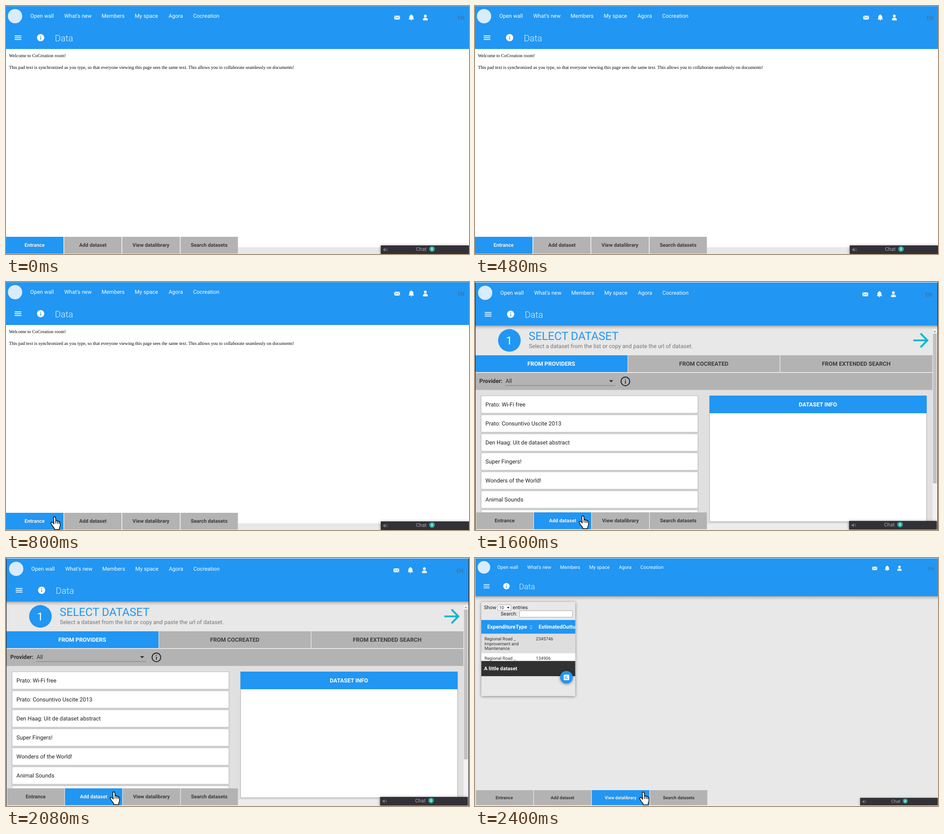
An HTML page that plays this animation: 1023x548 px, repeating every 3.2 s.

```html
<!DOCTYPE html>
<html lang="en">
<head>
<meta charset="utf-8">
<title>Data room</title>
<style>
html, body { margin: 0; width: 100%; height: 100%; overflow: hidden; background: #fff; }
svg { display: block; width: 100%; height: 100%; }
text { font-family: Roboto, sans-serif; text-rendering: geometricPrecision; white-space: pre; }
.pad { font: 10.22px "Liberation Serif", serif; }
.mid { text-anchor: middle; }
.b { font-weight: 700; }
.blue { fill: #2196f3; }
.white { fill: #fff; }
.grey { fill: #b3b3b3; }
.dark { fill: #3c3c3c; }
.line { fill: none; stroke: #2196f3; }
.card { fill: #fff; stroke: #bdbdbd; filter: drop-shadow(0 1px 1px rgba(0,0,0,.15)); }
.lift { filter: drop-shadow(0 1px 3px rgba(0,0,0,.45)); }

.point, .add, .view { opacity: 0; animation: 3.2s step-end infinite; }
.point { animation-name: point; }
.add { animation-name: add; }
.view { animation-name: view; }
@keyframes point { 0% { opacity: 0 } 25%, 50% { opacity: 1 } 100% { opacity: 0 } }
@keyframes add { 0% { opacity: 0 } 50% { opacity: 1 } 100% { opacity: 0 } }
@keyframes view { 0% { opacity: 0 } 75% { opacity: 1 } 100% { opacity: 0 } }
</style>
</head>
<body>
<svg viewBox="0 0 1023 548">
  <defs>
    <linearGradient id="fade" x2="0" y2="1">
      <stop stop-color="#000" stop-opacity=".32"/>
      <stop offset=".4" stop-color="#000" stop-opacity=".12"/>
      <stop offset="1" stop-color="#000" stop-opacity="0"/>
    </linearGradient>
    <clipPath id="frame"><rect x="14" y="97" width="207.5" height="208"/></clipPath>

    <g id="nav" class="white">
      <circle cx="20" cy="22.5" r="15.8" fill="#d9ecfd"/>
      <g font-size="12">
        <text x="53.5" y="26.4">Open wall</text>
        <text x="128.7" y="26.4">What's new</text>
        <text x="211.3" y="26.4">Members</text>
        <text x="284.6" y="26.4">My space</text>
        <text x="359.2" y="26.4">Agora</text>
        <text x="413.4" y="26.4">Cocreation</text>
      </g>
      <path d="M19 65.2h15v1.7h-15zm0 4h15v1.7h-15zm0 4h15v1.7h-15z"/>
      <circle cx="76.5" cy="70" r="8"/>
      <path class="blue" d="M75.6 69.2h1.8v4.8h-1.8zm0-3.3h1.8v1.8h-1.8z"/>
      <text x="108" y="77.5" font-size="19.7" font-weight="300" opacity=".88">Data</text>
    </g>

    <g id="tools" class="white">
      <rect x="857.8" y="21.4" width="12.6" height="8.6" rx="1"/>
      <path class="line" d="M858.2 22.2l5.9 4.3 5.9-4.3M858.2 29.6l4.1-4M870 29.6l-4.1-4" stroke-width="1"/>
      <path d="M889.6 29.8v-.8l1.5-1.5v-3.6q0-3 3.2-3.9 0-1.4 1.2-1.4t1.2 1.4q3.2.9 3.2 3.9v3.6l1.5 1.5v.8zM893.9 30.5h3.2q-.2 1.7-1.6 1.7t-1.6-1.7z"/>
      <circle cx="926.5" cy="22.1" r="3.1"/>
      <path d="M921.2 31.8v-2q0-3.7 5.3-3.7t5.3 3.7v2z"/>
      <text x="998" y="30.3" font-size="11.4" style="fill:#4b6a88">EN</text>
    </g>

    <g id="chat">
      <rect class="lift" x="828" y="529" width="195" height="19" fill="#323138"/>
      <path d="M833.5 536.6h2l3-2.5v8.8l-3-2.5h-2z" fill="#77767c"/>
      <path d="M840 536.4q1.4 2 0 4.2M841.7 535q2.4 3.5 0 7" fill="none" stroke="#77767c" stroke-width=".9"/>
      <text x="906" y="541.4" font-size="11.2" fill="#aaa9ad">Chat</text>
      <circle cx="941.3" cy="537" r="6.3" fill="#26a69a"/>
      <text class="mid b white" x="941.3" y="540" font-size="8.5">0</text>
    </g>

    <g id="boxes" class="grey">
      <rect y="510" width="127" height="37.3"/>
      <rect x="128.4" y="510" width="127" height="37.3"/>
      <rect x="256.8" y="510" width="127.4" height="37.3"/>
      <rect x="385.6" y="510" width="126.8" height="37.3"/>
    </g>
    <g id="labels" class="mid b">
      <text x="63.2" y="532">Entrance</text>
      <text x="192" y="532">Add dataset</text>
      <text x="320.3" y="532">View datalibrary</text>
      <text x="448.8" y="532">Search datasets</text>
    </g>

    <g id="hand" stroke="#000" stroke-width="1.4" stroke-linejoin="round">
      <path class="white" d="M7 3Q7 .8 9 .8 11.3 .8 11.5 3L12 10Q12.3 8.7 14 9 15.7 9.2 15.8 11 16.3 9.9 17.6 10.2 19.2 10.5 19.3 12.2 20 11.6 20.9 12 22 12.6 22 14L21.8 20Q21.5 23 20 25V29H9V26.5Q5 22 2 16.5 .6 14 2 13 3.8 12.2 5.5 14L8 16.5Z"/>
      <path fill="none" d="M12 10v5.5M15.8 11v5M19.3 12.2v4.3"/>
    </g>
  </defs>

  <!-- Entrance -->
  <g>
    <rect class="white" width="1023" height="548"/>
    <rect class="blue" width="1023" height="95"/>
    <rect width="1023" height="1" fill="#7ba6cc"/>
    <use href="#nav"/>
    <use href="#tools"/>
    <text class="pad" x="6.4" y="113">Welcome to CoCreation room!</text>
    <text class="pad" x="6.4" y="139.3">This pad text is synchronized as you type, so that everyone viewing this page sees the same text. This allows you to collaborate seamlessly on documents!</text>
    <rect x="512.4" y="533" width="511" height="15" fill="#e8e8e8"/>
    <use href="#boxes"/>
    <rect class="blue" y="510" width="127" height="37.3"/>
    <use href="#labels" class="dark" font-size="11.2"/>
    <text class="mid b white" x="63.2" y="532" font-size="11.2">Entrance</text>
    <use href="#chat"/>
  </g>
  <use class="point" href="#hand" x="98" y="518"/>

  <!-- Add dataset -->
  <g class="add">
    <rect width="1023" height="548" fill="#e0e0e0"/>
    <rect y="96" width="1023" height="66" fill="#e8e8e8"/>
    <rect y="96" width="1023" height="9" fill="url(#fade)"/>
    <rect class="blue" y="1" width="1023" height="95"/>
    <rect width="1023" height="1.2" fill="#dfe6ec"/>
    <g transform="translate(2.6 1.6) scale(.995)">
      <use href="#nav"/>
      <use href="#tools"/>
    </g>

    <circle class="blue" cx="76" cy="129" r="25"/>
    <text class="mid white" x="75.5" y="137.5" font-size="24.5">1</text>
    <text class="blue" x="118.6" y="127.6" font-size="25">SELECT DATASET</text>
    <text x="119" y="146" font-size="12.5" fill="#757575">Select a dataset from the list or copy and paste the url of dataset.</text>
    <path d="M968.5 129h30M984.5 113.8l15 15.2-15 15.2" fill="none" stroke="#10b8d2" stroke-width="4.2"/>

    <rect y="161" width="1011" height="40" fill="#e4e4e4"/>
    <rect class="blue" x="1" y="162" width="336" height="37"/>
    <path class="grey" d="M338.3 162h335v37h-335zM674.8 162h336v37h-336zM1 201h1009.8v37.5H1z"/>
    <g class="mid b dark" font-size="12.6">
      <text class="white" x="168.5" y="185">FROM PROVIDERS</text>
      <text x="505.5" y="185">FROM COCREATED</text>
      <text x="842.3" y="185">FROM EXTENDED SEARCH</text>
    </g>
    <g font-size="12.5" fill="#2c2c2c">
      <text class="b" x="9.6" y="223">Provider:</text>
      <text x="67.4" y="223">All</text>
      <path d="M67 228.2h243v1H67z" fill="#777"/>
      <path d="M296.3 217h9l-4.5 4.6z"/>
      <circle cx="332.3" cy="219.6" r="9.6" fill="none" stroke="#222" stroke-width="2"/>
      <path d="M331.3 218.5h2v6h-2zm0-4h2v2.1h-2z"/>
    </g>

    <g class="card">
      <rect x="13.5" y="251.5" width="479" height="38.4"/>
      <rect x="13.5" y="293.5" width="479" height="38.4"/>
      <rect x="13.5" y="335.5" width="479" height="38.4"/>
      <rect x="13.5" y="377.5" width="479" height="38.4"/>
      <rect x="13.5" y="419.5" width="479" height="38.4"/>
      <rect x="13.5" y="461.5" width="479" height="38.4"/>
      <rect x="13.5" y="503.5" width="479" height="38.4"/>
      <rect x="518.5" y="251.5" width="479" height="278"/>
    </g>
    <g font-size="12.5" fill="#212121">
      <text x="23" y="275">Prato: Wi-Fi free</text>
      <text x="23" y="317">Prato: Consuntivo Uscite 2013</text>
      <text x="23" y="359">Den Haag: Uit de dataset abstract</text>
      <text x="23" y="401">Super Fingers!</text>
      <text x="23" y="443">Wonders of the World!</text>
      <text x="23" y="485">Animal Sounds</text>
    </g>
    <rect class="blue" x="518" y="251" width="480" height="39"/>
    <text class="mid b white" x="757.8" y="275" font-size="12.5">DATASET INFO</text>

    <rect x="1010.8" y="104" width="10.5" height="430" fill="#f1f1f1"/>
    <rect x="1011.8" y="114" width="8.4" height="331" fill="#c1c1c1"/>
    <path d="M1013.4 110.6h5l-2.5-3z" fill="#888"/>

    <rect x="1" y="534" width="1021" height="14" fill="#ececec"/>
    <rect x="1" y="508.5" width="512" height="39" fill="#e8e8e8"/>
    <g transform="translate(2.6 1.6) scale(.995)">
      <use href="#boxes"/>
      <rect class="blue" x="128.4" y="510" width="127" height="37.3"/>
      <use href="#labels" class="dark" font-size="11.2"/>
      <text class="mid b white" x="192" y="532" font-size="11.2">Add dataset</text>
      <use href="#chat"/>
    </g>
    <path d="M0 1h1.2v547H0zM1021.8 1h1.2v547h-1.2z" fill="#2b2b2b"/>
    <use href="#hand" x="229" y="516"/>
  </g>

  <!-- View datalibrary -->
  <g class="view">
    <rect width="1023" height="548" fill="#e8e8e8"/>
    <rect y="84" width="1023" height="9" fill="url(#fade)"/>
    <rect class="blue" x="1" y="1" width="1022" height="83.2"/>
    <path d="M0 0h1023v1H1v547H0z" fill="#d4d9de"/>
    <use href="#nav" transform="translate(2.2 .8) scale(.879)"/>
    <use href="#tools" transform="translate(123.5 .4) scale(.879)"/>

    <rect class="lift" x="14" y="97" width="207.5" height="208" fill="#e8e8e8"/>
    <g clip-path="url(#frame)">
      <g font-size="11" fill="#1c1c1c">
        <text x="19.8" y="112.8">Show</text>
        <text x="83.3" y="112.8">entries</text>
        <text x="56.8" y="127">Search:</text>
        <path d="M50.5 103.5h29v12.4h-29zM98.5 116.5h117v14.3h-117z" fill="#fff" stroke="#aaa"/>
        <text x="53.5" y="113.2" font-size="9.4">10</text>
        <path d="M70.8 108h5l-2.5 4z"/>
      </g>
      <rect class="blue" x="14" y="137" width="208" height="30.5"/>
      <g class="b white" font-size="11.7">
        <text x="27" y="156.3">ExpenditureType</text>
        <text x="140.4" y="156.3">EstimatedOutturn</text>
      </g>
      <path d="M121.5 151.3l2.3-2.3 2.3 2.3M121.5 154l2.3 2.3 2.3-2.3" fill="none" stroke="#fff"/>
      <rect x="14" y="167.5" width="208" height="43" fill="#dedede"/>
      <rect class="white" x="14" y="210.5" width="208" height="43"/>
      <g font-size="9.7" fill="#333">
        <text x="21" y="182">Regional Road _</text>
        <text x="21" y="192.6">Improvement and</text>
        <text x="21" y="203.2">Maintenance</text>
        <text x="134.6" y="182">2345746</text>
        <text x="21" y="224.6">Regional Road _</text>
        <text x="21" y="235.2">Improvement and</text>
        <text x="134.6" y="224.6">134906</text>
      </g>
      <rect x="14" y="227.5" width="208" height="33.6" fill="#262626" fill-opacity=".94"/>
      <text class="b white" x="20" y="248.2" font-size="11.2">A little dataset</text>
    </g>
    <circle class="blue lift" cx="202" cy="263.5" r="14"/>
    <rect class="white" x="196" y="257.8" width="12.2" height="12.2" rx="1.4"/>
    <path class="line" d="M199.2 262.2v5.2M202.1 260.4v7M205 265v2.4" stroke-width="1.4"/>

    <use href="#boxes" transform="translate(2 59.1) scale(.998 .89)"/>
    <rect class="blue" x="258.2" y="513" width="127" height="33.2"/>
    <g transform="translate(2 1)" font-size="9.65">
      <use href="#labels" class="dark" x="-.7"/>
      <text class="mid b white" x="319.6" y="532">View datalibrary</text>
    </g>
    <use href="#chat" transform="translate(123.2 65) scale(.879)"/>
    <path d="M0 547h1023v1H0z" fill="#f4f4f4"/>
    <use href="#hand" x="362.5" y="516.5"/>
  </g>
</svg>
</body>
</html>
```
